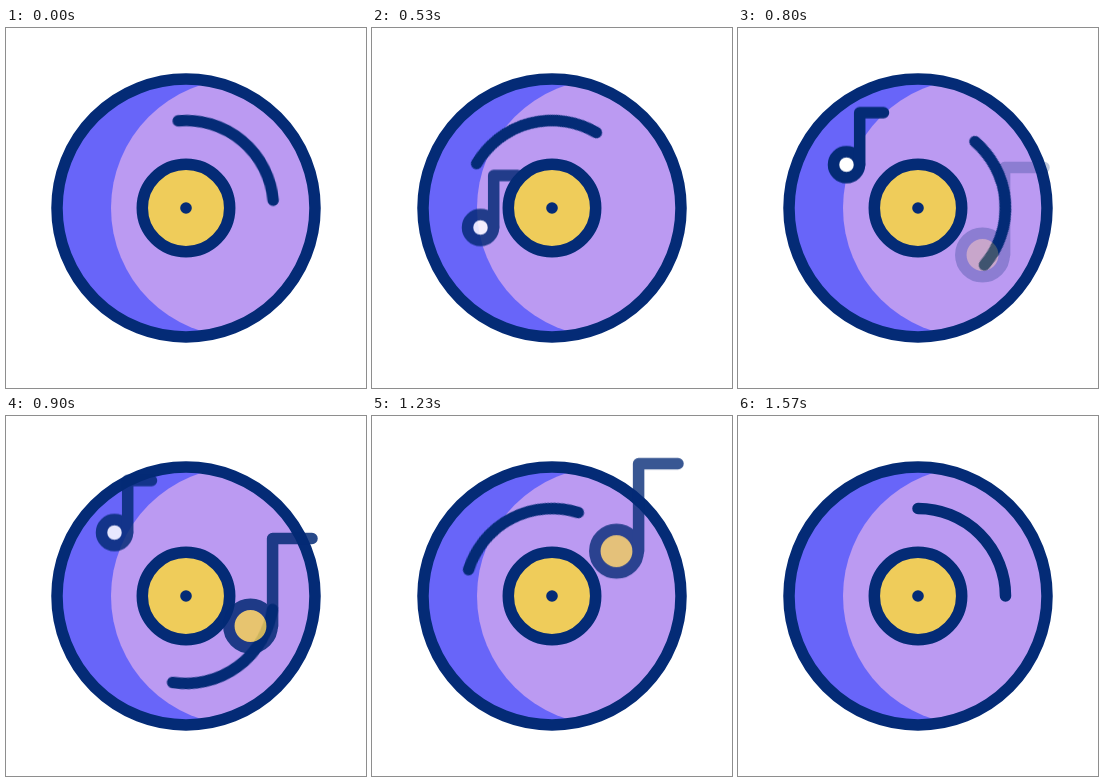
Animation of 360 by 360 pixels, one loop 2 s. Source, as an HTML page:

```html
<!DOCTYPE html>
<html lang="en">
<head>
<meta charset="utf-8">
<title>Spinning record</title>
<style>
  :root {
    --navy: #042b76;
    --blue: #6865f9;
    --lilac: #bb9af2;
    --gold: #efcc5a;
    --loop: 2000ms linear infinite;
  }
  html, body { margin: 0; width: 100%; height: 100%; overflow: hidden; background: #fff; }
  svg { display: block; width: 100vw; height: 100vh; }

  .line { fill: none; stroke: var(--navy); stroke-width: 11.5; stroke-linecap: round; stroke-linejoin: round; }
  .gold { fill: var(--gold); }

  .shine { transform-origin: 180px 180px; animation: spin var(--loop); }
  .rise-a { animation: rise-a var(--loop), fade-a var(--loop); }
  .rise-b { animation: rise-b var(--loop), fade-b var(--loop); }

  /* Wind back, then a full turn forward; the loop enters mid-move. */
  @keyframes spin {
    0% { transform: rotate(-5deg); animation-timing-function: cubic-bezier(.333, .26, .667, 1); }
    25% { transform: rotate(-61deg); animation-timing-function: cubic-bezier(.29, 0, .66, 1); }
    75.3%, 100% { transform: rotate(360deg); }
  }

  @keyframes rise-a {
    0%, 10% { transform: translateY(242.4px); animation-timing-function: cubic-bezier(.333, 0, .667, 1); }
    56.67%, 100% { transform: translateY(93.4px); }
  }
  @keyframes fade-a {
    0%, 19.6% { opacity: 0; }
    27.9%, 43.75% { opacity: 1; }
    52.1%, 100% { opacity: 0; }
  }

  @keyframes rise-b {
    0%, 31.67% { transform: translateY(239.5px); animation-timing-function: cubic-bezier(.333, 0, .667, 1); }
    78.33%, 100% { transform: translateY(91.5px); }
  }
  @keyframes fade-b {
    0%, 37.9% { opacity: 0; }
    46.25%, 59.8% { opacity: 1; }
    68.2%, 100% { opacity: 0; }
  }
</style>
</head>
<body>
<svg viewBox="0 0 360 360">
  <clipPath id="disc"><circle cx="180" cy="180" r="129"/></clipPath>

  <circle cx="180" cy="180" r="129" fill="var(--blue)"/>
  <circle cx="234" cy="180" r="129" fill="var(--lilac)" clip-path="url(#disc)"/>
  <circle class="line" cx="180" cy="180" r="129"/>

  <path class="line shine" d="M180 92.5A87.5 87.5 0 0 1 267.5 180"/>

  <g class="rise-a">
    <circle class="line" cx="108.5" r="13" style="fill:#fff"/>
    <path class="line" d="M121.7 0V-52H145.5"/>
  </g>

  <circle class="line gold" cx="180" cy="180" r="43.7" style="fill:var(--gold)"/>
  <circle cx="180" cy="180" r="5.8" fill="var(--navy)"/>

  <g class="rise-b">
    <circle class="line" cx="244.5" r="21.7" style="fill:var(--gold)"/>
    <path class="line" d="M266.6 0V-87.5H306"/>
  </g>
</svg>
</body>
</html>
```
